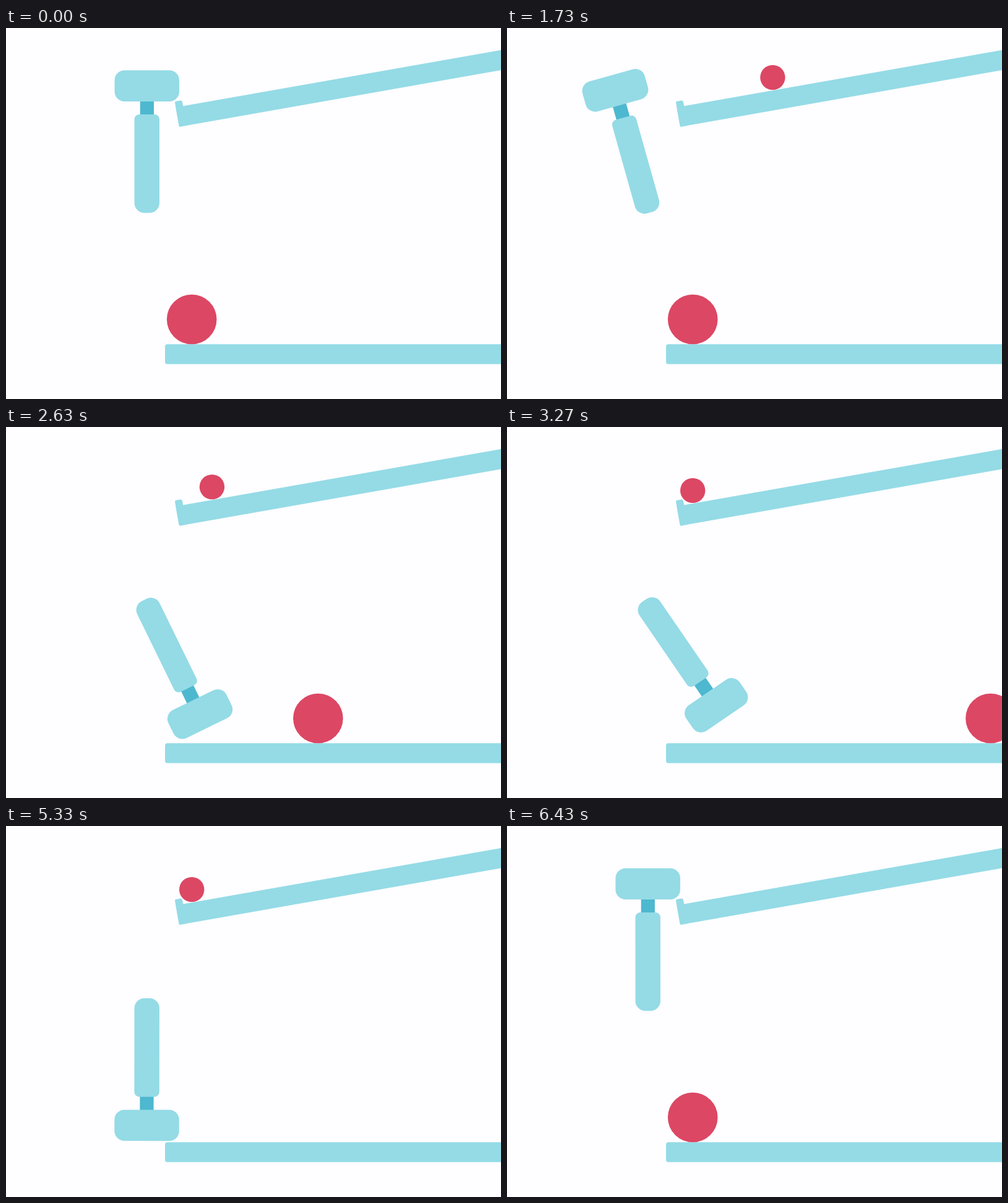
Animation of 800 by 601 pixels, one loop 6.46 s. Source, as an HTML page with a canvas:

```html
<!DOCTYPE html>
<html lang="en">
<head>
<meta charset="utf-8">
<title>Hammer and balls</title>
<style>
  html, body { margin: 0; width: 100%; height: 100%; overflow: hidden; background: #fefdff; }
  canvas { display: block; }
</style>
</head>
<body>
<canvas id="stage" width="800" height="601"></canvas>
<script>
const ctx = document.getElementById('stage').getContext('2d');
const LOOP = 6460, HOLD = 300, STEP = 100 / 3;
const BG = '#fefdff', LIGHT = '#94dbe6', NECK = '#4db8cf', RED = '#dc4764';
const SLOPE = Math.PI / 18;
const PIVOT = { x: 227.75, y: 289.3 };
const REST = { x: 300.2, y: 102.9 };
const BIG = { x: 300.2, y: 472, r: 40.3 };
const SMALL_R = 20.2;

const clamp = p => Math.min(1, Math.max(0, p));
const phase = (t, start, length) => clamp((t - start) / length);
const mix = (a, b, p) => a + (b - a) * p;

// Eases
const mirror = f => p => p < 0.5 ? f(2 * p) / 2 : 1 - f(2 - 2 * p) / 2;
const cubicInOut = mirror(p => p ** 3);
const circInOut = mirror(p => 1 - Math.sqrt(1 - p * p));
const quadOut = p => 1 - (1 - p) ** 2;

function bounceOut(p) {
  const n = 7.5625, d = 2.75;
  if (p < 1 / d) return n * p * p;
  if (p < 2 / d) return n * (p - 1.5 / d) ** 2 + 0.75;
  if (p < 2.5 / d) return n * (p - 2.25 / d) ** 2 + 0.9375;
  return n * (p - 2.625 / d) ** 2 + 0.984375;
}

// Slow start, long tail: a bezier with handles (a, 0) and (b, 1)
function softEase(p, a = 0.652, b = 0.122) {
  if (p <= 0 || p >= 1) return clamp(p);
  let lo = 0, hi = 1;
  for (let i = 0; i < 24; i++) {
    const s = (lo + hi) / 2, q = 1 - s;
    if (3 * q * q * s * a + 3 * q * s * s * b + s ** 3 < p) lo = s; else hi = s;
  }
  return 3 * lo * lo - 2 * lo ** 3;
}

function box(x, y, w, h, r, color = LIGHT) {
  ctx.fillStyle = color;
  ctx.beginPath();
  ctx.roundRect(x, y, w, h, r);
  ctx.fill();
}

function ball(x, y, r, alpha = 1) {
  if (alpha <= 0 || r <= 0) return;
  ctx.globalAlpha = alpha;
  ctx.fillStyle = RED;
  ctx.beginPath();
  ctx.arc(x, y, r, 0, 2 * Math.PI);
  ctx.fill();
  ctx.globalAlpha = 1;
}

function ramps() {
  box(257, 512.3, 560, 32.3, 4);
  ctx.save();
  ctx.translate(279.9, 160);
  ctx.rotate(-SLOPE);
  box(0, -41.5, 12, 41.5, [2, 3, 0, 2]);
  box(0, -32.1, 600, 32.1, [0, 0, 0, 2]);
  ctx.restore();
}

function hammer(degrees) {
  ctx.save();
  ctx.translate(PIVOT.x, PIVOT.y);
  ctx.rotate(-degrees * Math.PI / 180);
  box(-11, -171, 22.2, 23, 0, NECK);
  box(-52.25, -220.8, 104.5, 50.4, 16);
  box(-20.2, -149.4, 40.4, 159.6, [8, 8, 16, 16]);
  ctx.restore();
}

function hammerAngle(t, reset) {
  const swing = 215 * circInOut(phase(t, 1300, 1667));
  const settle = 35 * cubicInOut(phase(t, 3104, 1000));
  return (swing - settle) * (1 - reset);
}

function draw(time) {
  // Hold the opening pose, then run at 30 steps per second
  const t = time < HOLD ? 0 : HOLD + Math.floor((time - HOLD + 4) / STEP) * STEP;
  const reset = softEase(phase(t, 5310, 1140));

  ctx.fillStyle = BG;
  ctx.fillRect(0, 0, 800, 601);
  ramps();

  const back = 525 * (1 - bounceOut(phase(t, 165.3, 3000)));
  ball(REST.x + back, REST.y - back * Math.tan(SLOPE),
       SMALL_R * mix(1, 0.34, reset), 1 - reset);

  if (t < 4500) {
    ball(BIG.x + 560 * quadOut(phase(t, 2329, 1500)), BIG.y, BIG.r);
  } else {
    ball(BIG.x, BIG.y - 2.3 * (1 - reset), BIG.r * mix(0.25, 1, reset), reset);
  }

  hammer(hammerAngle(t, reset));
}

const begin = performance.now();
function tick() {
  draw((performance.now() - begin) % LOOP);
  requestAnimationFrame(tick);
}
tick();
</script>
</body>
</html>
```
